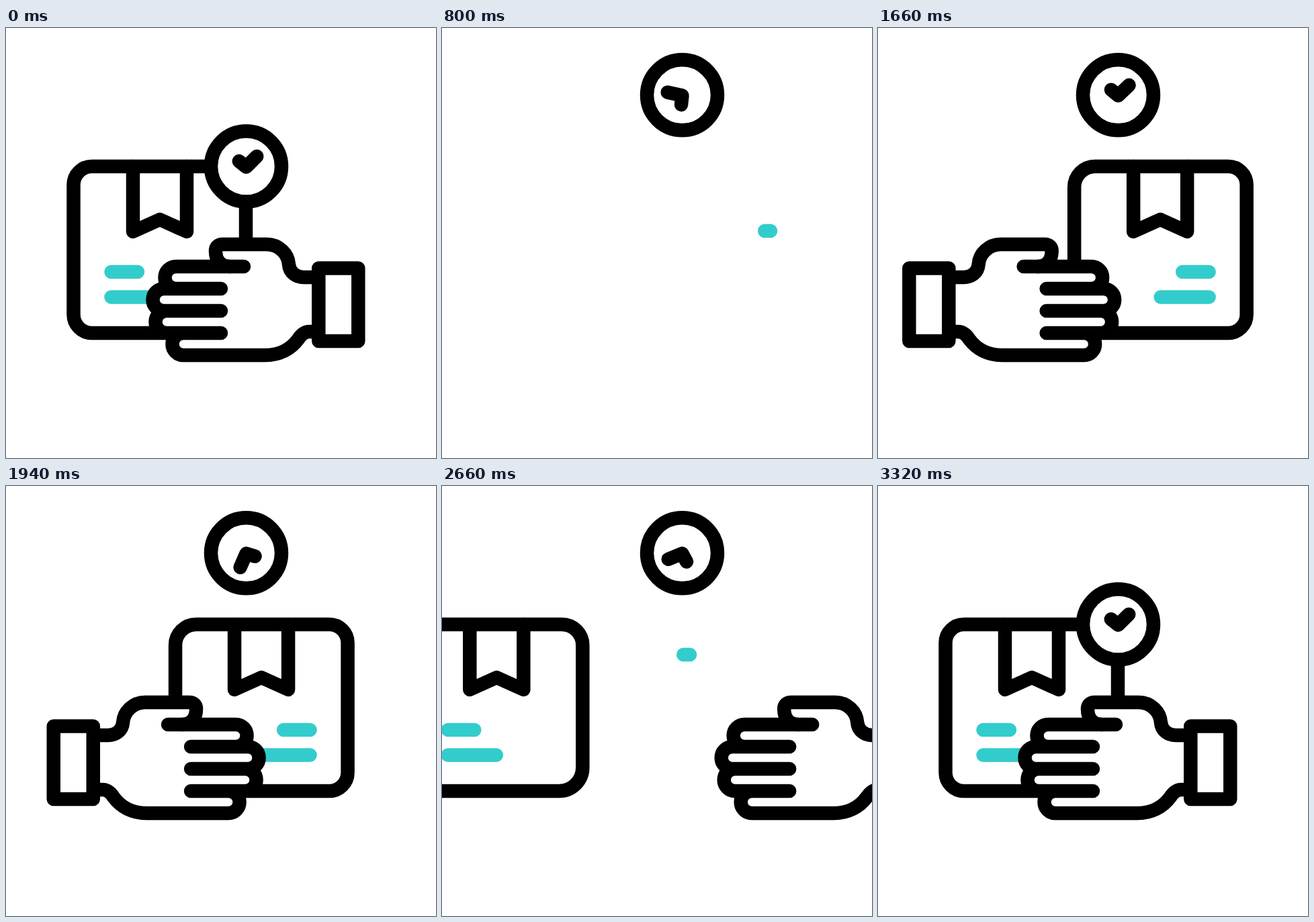
Write an HTML page that moves like this. It is 640x640 px and loops after 3.54 s.

```html
<!DOCTYPE html>
<html lang="en">
<head>
<meta charset="utf-8">
<title>Parcel delivery</title>
<style>
  html, body { margin: 0; width: 100%; height: 100%; overflow: hidden; background: #fff; }
  svg { display: block; width: 100vw; height: 100vh; }
  .ink { fill: none; stroke: #000; stroke-width: 20.5; stroke-linecap: round; stroke-linejoin: round; }
  .teal { fill: none; stroke: #33cccc; stroke-width: 20.5; stroke-linecap: round; }
  .paper { fill: #fff; }
</style>
</head>
<body>
<svg viewBox="0 0 640 640">
  <g id="dashes"></g>
  <g id="box">
    <path class="ink paper" d="M128 206H326A31 31 0 0 1 357 237V419A35 35 0 0 1 322 454H128A27.5 27.5 0 0 1 100.5 426.5V233.5A27.5 27.5 0 0 1 128 206Z"/>
    <path class="ink" d="M189 206V303L229 285L269 303V206"/>
    <path class="teal" d="M156.5 363H196M156.5 400.5H228.5"/>
  </g>
  <g id="hand">
    <path class="paper" d="M333 355C320 355 312 346 312 332Q312 322 323 322H388C406 322 420 336 421 352C422 364 432 371 443 371H465V452H451C444 452 439 457 435 463C424 478 407 487 386 487H264A16.5 16.5 0 0 1 264 454H239A16.5 16.5 0 0 1 239 421H235A16.5 16.5 0 0 1 235 388H253A16.5 16.5 0 0 1 253 355Z"/>
    <path class="ink" d="M333 355C320 355 312 346 312 332Q312 322 323 322H388C406 322 420 336 421 352C422 364 432 371 443 371H465"/>
    <path class="ink" d="M354 355H253A16.5 16.5 0 0 0 253 388H320M253 388H235A16.5 16.5 0 0 0 235 421H320M239 421A16.5 16.5 0 0 0 239 454H320M264 454A16.5 16.5 0 0 0 264 487H386C407 487 424 478 435 463C439 457 444 452 451 452H465"/>
    <rect class="ink paper" x="465.3" y="357.5" width="59" height="108.5"/>
  </g>
  <g id="clock">
    <circle class="ink paper" r="52.5"/>
    <path id="tick" class="ink" d="M-10.7 -7.7L0 .8L15.8 -15"/>
  </g>
</svg>
<script>
const LOOP = 3540;
const $ = id => document.getElementById(id);
const box = $('box'), hand = $('hand'), clock = $('clock'), tick = $('tick');

const clamp = u => Math.max(0, Math.min(1, u));
const span = (t, from, to) => clamp((t - from) / (to - from));
const smooth = u => { u = clamp(u); return u * u * (3 - 2 * u); };
const arrive = (t, from, to, dist) => dist * (1 - span(t, from, to)) ** 2;

// Short speed lines: start x, y, direction, start time
const lines = [[379, 302, 1, 520], [287, 251, 1, 990], [277, 302, -1, 2140], [369, 251, -1, 2620]]
  .map(([x, y, dir, start]) => {
    const el = document.createElementNS('http://www.w3.org/2000/svg', 'path');
    el.setAttribute('class', 'teal');
    $('dashes').append(el);
    return { el, x, y, dir, start };
  });

function place(el, dx, flipped) {
  el.setAttribute('transform', flipped ? `translate(${640 + dx} 0) scale(-1 1)` : `translate(${dx} 0)`);
}

function draw(t) {
  const pullRight = 580 * smooth(span(t, 200, 882));
  const pullLeft = -580 * smooth(span(t, 1850, 2500));

  if (t < 1100) {
    place(box, pullRight);
    place(hand, pullRight);
  } else {
    if (t < 2446) place(box, arrive(t, 1330, 1723, 368) + pullLeft, true);
    else place(box, arrive(t, 2446, 3034, -367));
    if (t < 2419) place(hand, -14 + arrive(t, 1330, 1850, -419) + pullLeft, true);
    else place(hand, arrive(t, 2419, 3165, 432));
  }

  const lift = smooth(span(t, 200, 400)) - smooth(span(t, 2940, 3310));
  clock.setAttribute('transform', `translate(357.5 ${206 - 106.2 * lift})`);
  tick.setAttribute('transform', `rotate(${1440 * span(t, 378, 2940)} 0 .8)`);

  for (const { el, x, y, dir, start } of lines) {
    const u = (t - start) / 320;
    const head = x + dir * 110 * smooth(u / 0.7);
    const tail = x + dir * 110 * smooth((u - 0.3) / 0.7);
    el.setAttribute('visibility', u > 0 && u < 1 ? 'visible' : 'hidden');
    el.setAttribute('d', `M${tail} ${y}H${head}`);
  }
}

const begin = performance.now();
function play() {
  draw((performance.now() - begin) % LOOP);
  requestAnimationFrame(play);
}
play();
</script>
</body>
</html>
```
